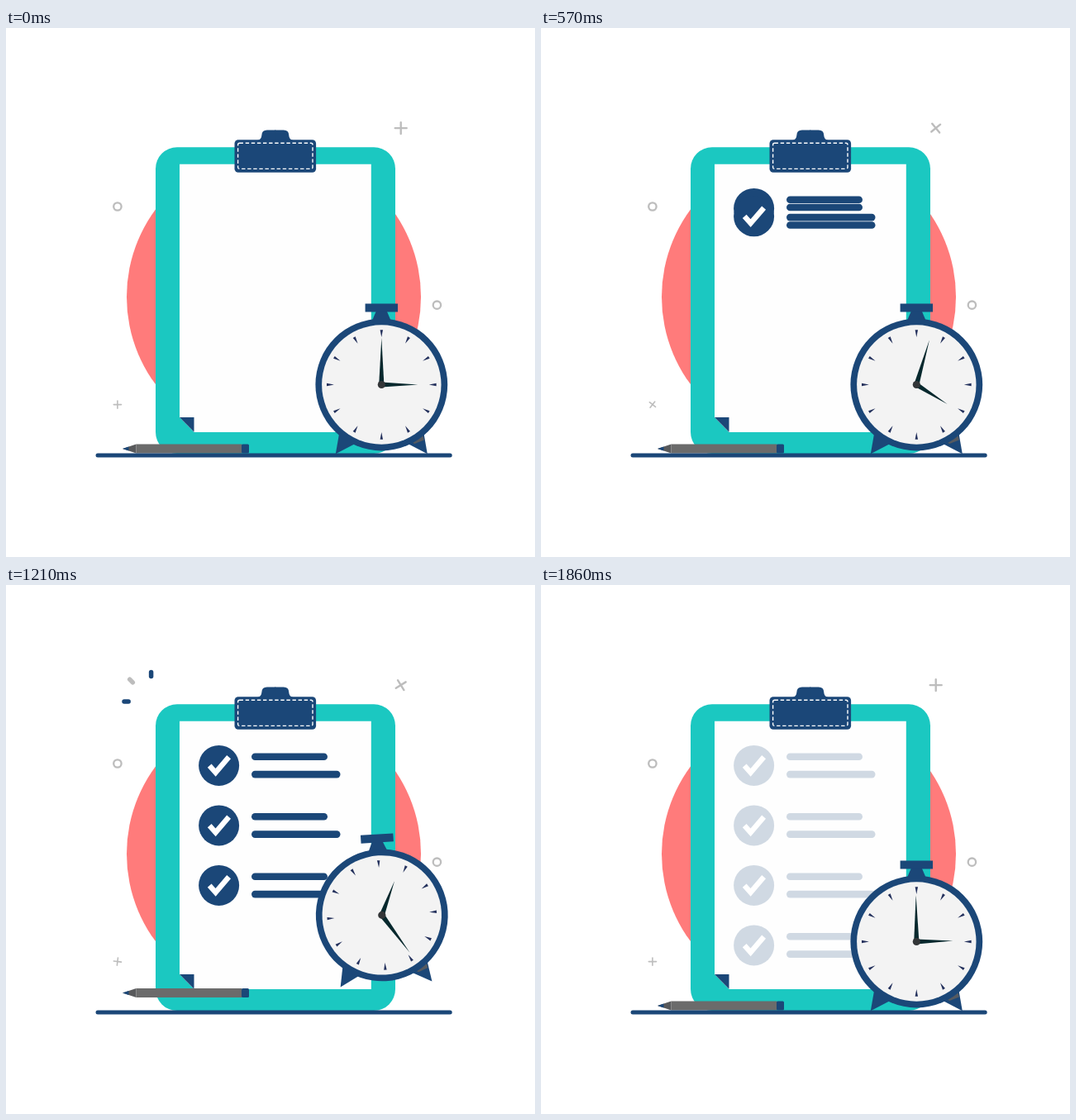
Animation of 640 by 640 pixels, one loop 1.93 s. Source, as an HTML page with a canvas:

```html
<!DOCTYPE html>
<html lang="en">
<head>
<meta charset="utf-8">
<title>Checklist and clock</title>
<style>
  html, body { margin: 0; width: 100%; height: 100%; overflow: hidden; background: #fff; }
  canvas { display: block; width: 640px; height: 640px; }
</style>
</head>
<body>
<canvas id="stage" width="640" height="640"></canvas>
<script>
const ctx = document.getElementById('stage').getContext('2d');
const LOOP = 1930, STEPS = 27;
const NAVY = '#1b4778', TEAL = '#1bc8c1', CORAL = '#ff7b7b', GREY = '#bdbdbd', HAND = '#06282d';

const unit = (k, a, b) => Math.min(Math.max((k - a) / (b - a), 0), 1);
const smooth = x => x * x * (3 - 2 * x);
const ramp = (k, a, b) => smooth(unit(k, a, b));

// Cubic bezier easing with y handles at 0 and 1
function ease(x, x1, x2) {
  let lo = 0, hi = 1;
  for (let i = 0; i < 30; i++) {
    const s = (lo + hi) / 2, r = 1 - s;
    if (3 * s * r * r * x1 + 3 * s * s * r * x2 + s * s * s < x) lo = s; else hi = s;
  }
  return smooth(lo);
}

function disc(x, y, r, color) {
  ctx.fillStyle = color;
  ctx.beginPath();
  ctx.arc(x, y, r, 0, 7);
  ctx.fill();
}
function box(x, y, w, h, r, color) {
  ctx.fillStyle = color;
  ctx.beginPath();
  ctx.roundRect(x, y, w, h, r);
  ctx.fill();
}
function trace(p) {
  ctx.beginPath();
  for (let i = 0; i < p.length; i += 2) ctx.lineTo(p[i], p[i + 1]);
}
function poly(color, ...p) {
  ctx.fillStyle = color;
  trace(p);
  ctx.fill();
}
function line(color, width, cap, ...p) {
  ctx.strokeStyle = color;
  ctx.lineWidth = width;
  ctx.lineCap = cap;
  trace(p);
  ctx.stroke();
}
function at(x, y, deg, draw) {
  ctx.save();
  ctx.translate(x, y);
  ctx.rotate(deg * Math.PI / 180);
  draw();
  ctx.restore();
}

function plus(x, y, arm, width, deg) {
  at(x, y, deg, () => {
    line(GREY, width, 'round', -arm, 0, arm, 0);
    line(GREY, width, 'round', 0, -arm, 0, arm);
  });
}
function ring(x, y) {
  ctx.strokeStyle = GREY;
  ctx.lineWidth = 2.3;
  ctx.beginPath();
  ctx.arc(x, y, 4.7, 0, 7);
  ctx.stroke();
}

// Short strokes whose head flies out before the tail follows
function sparks(k) {
  if (k < 14 || k > 18) return;
  const head = 17 * unit(k, 14, 16), tail = 17 * unit(k, 14, 18.3) - 0.01;
  const ray = (x, y, deg, color) =>
    at(x, y, deg, () => line(color, 5.5, 'round', tail, 0, head, 0));
  ray(161.7, 126.2, 225, GREY);
  ray(175.6, 122.4, 270, NAVY);
  ray(160, 140.9, 180, NAVY);
}

function board() {
  box(181, 144.2, 290, 370.8, 26, TEAL);
  poly('#fefefe', 210, 164.8, 441.8, 164.8, 441.8, 489, 227.5, 489, 210, 471);
  poly(NAVY, 210, 471, 227.5, 471, 227.5, 488.7);
}

function row(y, alpha) {
  ctx.globalAlpha = alpha;
  disc(257.6, y, 24.5, NAVY);
  box(297, y - 15, 92, 8.6, 4.3, NAVY);
  box(297, y + 6.4, 107.5, 8.6, 4.3, NAVY);
  ctx.globalAlpha = 1;
  line('#fff', 6.4, 'butt', 246.2, y + 0.2, 253.6, y + 8.4, 269.6, y - 10.2);
}

// Each row slides down out of the one above it
function rows(k) {
  ctx.save();
  ctx.beginPath();
  ctx.rect(210, 165, 232, 324);
  ctx.clip();
  for (let i = 0; i < 4; i++) {
    const start = 1.2 + 5.9 * i;
    if (k > start) row(218.4 + 72.5 * (i - 1 + ramp(k, start, start + 4)), 1 - unit(k, 24, 26.5));
  }
  ctx.restore();
}

function clip() {
  at(325.8, 136, 0, () => {
    for (const side of [-1, 1]) {
      ctx.fillStyle = NAVY;
      ctx.beginPath();
      ctx.moveTo(side * -0.5, 0);
      ctx.lineTo(side * 21.7, 0);
      ctx.quadraticCurveTo(side * 16.7, -1, side * 16.5, -6);
      ctx.quadraticCurveTo(side * 16.3, -12.4, side * 10, -12.4);
      ctx.lineTo(side * -0.5, -12.4);
      ctx.fill();
    }
  });
  box(276.5, 135.2, 98.6, 39.6, 4.5, NAVY);
  ctx.strokeStyle = '#fff';
  ctx.lineWidth = 1.4;
  ctx.lineCap = 'butt';
  ctx.setLineDash([4.4, 2.7]);
  ctx.beginPath();
  ctx.roundRect(280.6, 139.2, 90.4, 31.2, 2);
  ctx.stroke();
  ctx.setLineDash([]);
}

function pen(k) {
  const lift = 15.6 * (ramp(k, 8, 14) - ramp(k, 17, 23));
  const tilt = 9.4 * (ramp(k, 8.6, 14) - ramp(k, 14, 17));
  at(217.5, 509 - lift, tilt, () => {
    poly('#58595b', -76.5, 0, -60, -5.5, -60, 5.5);
    poly(NAVY, -76.5, 0, -69, -2.5, -69, 2.5);
    box(-60, -5.5, 128, 11, 0, '#6b6b6b');
    box(67.5, -5.5, 9, 11, 1.5, NAVY);
  });
}

function hand(deg, len) {
  at(0, 0, deg, () => poly(HAND, -3.1, 0, 0, -len, 3.1, 0));
}

function clock(k) {
  const turn = 360 * ease(k / STEPS, 0.94, 0.48);
  const lift = 33 * (ease(unit(k, 8, 19), 0.6, 0.3) - unit(k, 19, 24) ** 5);
  const swing = unit(k, 11, 20);
  const tilt = 8.8 * Math.sin(2 * Math.PI * swing) * (1 - 0.79 * swing);
  at(454.3 - 0.13 * tilt, 431.5 - lift, tilt, () => {
    for (const side of [-1, 1])
      poly(NAVY, side * 51, 58, side * 55.5, 83.7, side * 33, 72);
    poly('#555a60', 37, 70, 50, 61, 51.5, 67, 40, 71.5);
    poly(NAVY, -6, -90, 6, -90, 12, -76, -12, -76);
    box(-19.7, -98, 39.4, 10, 0, NAVY);
    disc(0, 0, 79.9, NAVY);
    disc(0, 0, 72.2, '#f3f3f3');
    for (let i = 0; i < 12; i++)
      at(0, 0, i * 30, () => poly('#23305c', -1.7, -66.3, 1.7, -66.3, 0, -57.5));
    hand(turn, 56.5);
    hand(90 + 2 * turn, 44);
    disc(0, 0, 4.6, '#333638');
  });
}

function draw(k) {
  ctx.fillStyle = '#fff';
  ctx.fillRect(0, 0, 640, 640);
  disc(324, 325.3, 178, CORAL);
  ring(134.9, 216);
  ring(521.4, 335.2);
  plus(477.7, 121.1, 7, 2.4, 90 * (ramp(k, 2.8, 12.4) + ramp(k, 13, 19.7)));
  plus(134.9, 455.6, 4.6, 1.6, -180 * ramp(k, 2, 19));
  sparks(k);
  board();
  rows(k);
  clip();
  pen(k);
  clock(k);
  line(NAVY, 5, 'round', 111, 517, 537.2, 517);
}

function tick() {
  // Motion is held on 27 even steps per loop
  const t = performance.now() % LOOP;
  draw(Math.floor((t + 6) / LOOP * STEPS) % STEPS);
  requestAnimationFrame(tick);
}
tick();
</script>
</body>
</html>
```
